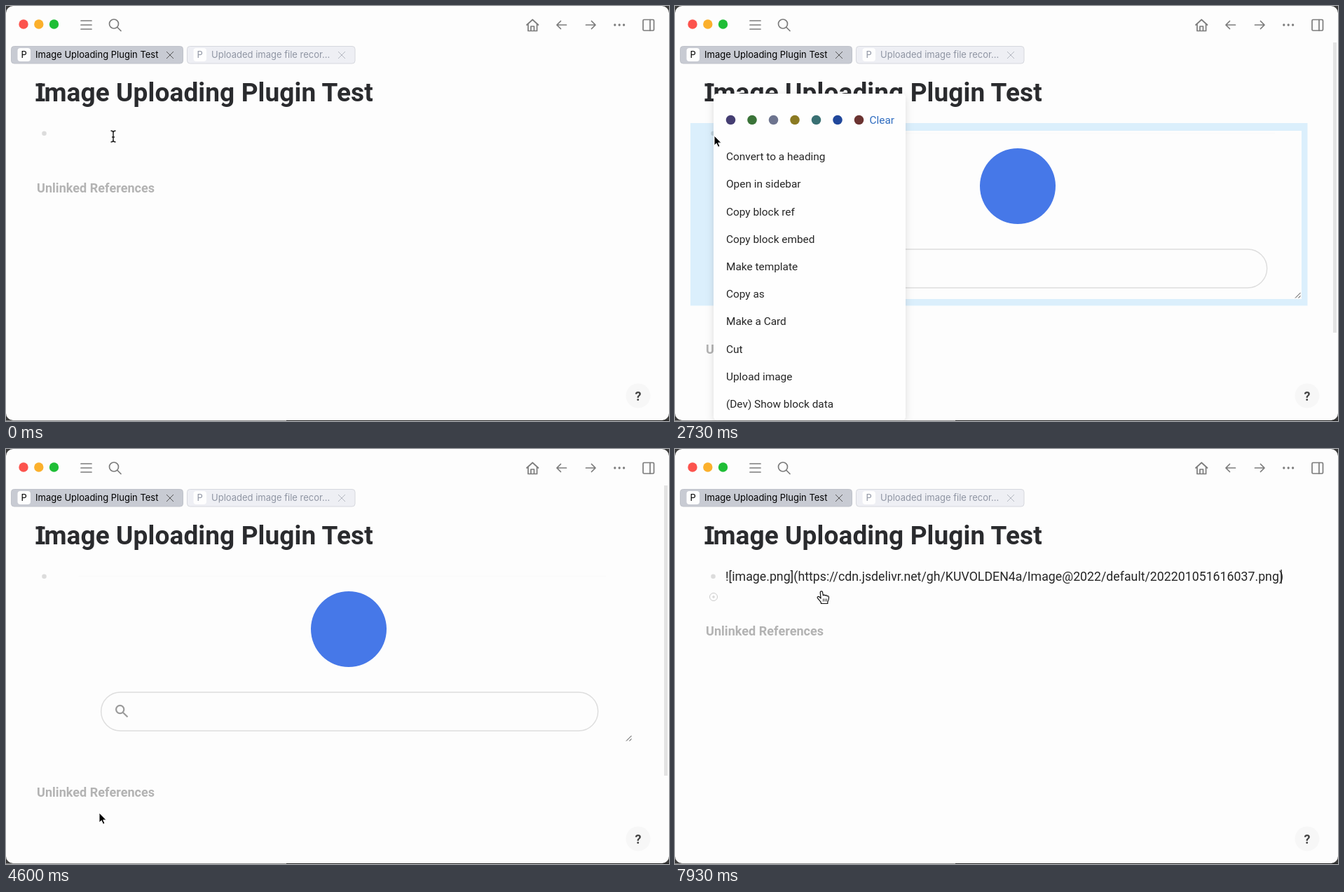
These frames come from a looping animation (946x592 px, 8000 ms). An HTML page:

```html
<!DOCTYPE html>
<html lang="en">
<head>
<meta charset="utf-8">
<title>Image Uploading Plugin Test</title>
<style>
  html, body { margin: 0; width: 100%; height: 100%; overflow: hidden; background: #3a3a3a; }
  svg { display: block; width: 946px; height: 592px; font-family: Roboto, "Noto Sans", sans-serif; }
  .ui { font: 13px Inter, sans-serif; }
  .icon { fill: none; stroke: #7c7c7c; stroke-width: 1.7; stroke-linecap: round; stroke-linejoin: round; }
  .title { font-weight: 700; font-size: 37px; letter-spacing: .1px; fill: #2a2b2e; }
  .refs { font-weight: 700; font-size: 18px; letter-spacing: .05px; fill: #b3b3b3; }
  .item { font-size: 15.4px; fill: #262626; }
  .link { fill: #2f6cc0; }
  .url { font-size: 17.75px; fill: #262626; }
  #menuBox { filter: drop-shadow(0 3px 6px #0002); }
</style>
</head>
<body>
<svg viewBox="0 0 946 592">
  <path d="M0 591H400V592H0Z" fill="#8a8a8a"/>
  <path d="M400 591H946V592H400Z" fill="#222"/>
  <rect width="946" height="591" rx="10" fill="#fdfdfd"/>

  <circle cx="25" cy="26" r="6.7" fill="#fc534d"/>
  <circle cx="46.8" cy="26" r="6.7" fill="#fbb02c"/>
  <circle cx="68.5" cy="26" r="6.7" fill="#1fbe36"/>
  <g class="icon">
    <path d="M107 21H122M107 27H122M107 33H122"/>
    <circle cx="154" cy="25.5" r="6.5"/><path d="M159 30.5L164 35.5"/>
    <path d="M743 27L751.3 19.5L759.6 27M745 25.5V35.5H757.6V25.5M749 35.5V29H753.5V35.5"/>
    <path d="M799.5 27H786M791.5 21.5L786 27L791.5 32.5"/>
    <path d="M827.5 27H841M835.5 21.5L841 27L835.5 32.5"/>
    <rect x="909" y="19.5" width="15.5" height="15.5" rx="1.5"/><path d="M919 19.5V35"/>
  </g>
  <path d="M868.8 27h0M875.2 27h0M881.6 27h0" stroke="#7c7c7c" stroke-width="3.3" stroke-linecap="round"/>

  <g class="ui">
    <rect x="7.5" y="57.5" width="245" height="24.5" rx="4" fill="#c8cbd3" stroke="#bfc2ca"/>
    <rect x="16.5" y="60" width="18.5" height="19" rx="4" fill="#fefefe"/>
    <text x="21.6" y="74">P</text>
    <text x="42" y="74">Image Uploading Plugin Test</text>
    <path d="M229 65L239 75M239 65L229 75" stroke="#555"/>
    <rect x="258.5" y="57.5" width="239.5" height="24.5" rx="4" fill="#eeeff4" stroke="#d6d8de"/>
    <rect x="267.5" y="60" width="18.5" height="19" rx="4" fill="#fefefe"/>
    <g fill="#8f95a3">
      <text x="272.6" y="74">P</text>
      <text x="293" y="74">Uploaded image file recor...</text>
    </g>
    <path d="M474 65L484 75M484 65L474 75" stroke="#b4b8c1"/>
  </g>

  <text class="title" x="43.5" y="136">Image Uploading Plugin Test</text>
  <path d="M42.5 110.5H55.5V114.5H42.5ZM42.5 132H55.5V136H42.5Z" fill="#2a2b2e"/>

  <rect id="select" x="22" y="167" width="880.5" height="260.5" fill="#b5dffb"/>
  <circle id="halo" cx="54.5" cy="181.5" r="9" fill="#e5e7e7"/>
  <circle cx="54.5" cy="181.8" r="3.3" fill="#000" opacity=".13"/>

  <g id="image">
    <rect x="72" y="178" width="822" height="240" fill="#fdfdfd"/>
    <path d="M103 181.5H856" stroke="#fafafa"/>
    <circle cx="489" cy="257" r="54" fill="#4678e8"/>
    <rect x="135.7" y="347" width="709" height="55" rx="27.5" fill="none" stroke="#dedede" stroke-width="1.5"/>
    <g fill="none" stroke="#9b9b9b" stroke-width="2.2">
      <circle cx="162.7" cy="371.5" r="5.6"/><path d="M167 376L173.5 382.3"/>
    </g>
    <path d="M885 416.5L892.5 409M889.5 416.5L892.5 413.5" stroke="#444"/>
    <rect x="939" y="52" width="5" height="414" fill="#e3e3e3"/>
  </g>

  <g id="edit">
    <text class="url" id="url" x="72" y="188">![image.png](https://cdn.jsdelivr.net/gh/KUVOLDEN4a/Image@2022/default/202201051616037.png)</text>
    <path id="caret" d="M0 172V192" stroke="#111" stroke-width="1.3"/>
    <circle cx="55" cy="211" r="5.5" fill="none" stroke="#ccc"/>
    <path d="M53 211H57M55 209V213" stroke="#ccc"/>
  </g>

  <text class="refs" id="refs" x="44">Unlinked References</text>

  <circle cx="902" cy="556" r="17.5" fill="#f7f7f7"/>
  <text x="902" y="562.5" text-anchor="middle" font-size="18" font-weight="700" fill="#444">?</text>

  <g id="menu">
    <rect id="menuBox" x="55" y="114" width="274" height="466" rx="5" fill="#fefefe"/>
    <g id="rows"></g>
    <text class="item link" x="277.5" y="157">Clear</text>
  </g>

  <g id="cursor" stroke-linejoin="round">
    <path id="beam" d="M-3.5-8Q0-8 0-5.5Q0-8 3.5-8M0-6V6M-3.5 8Q0 8 0 5.5Q0 8 3.5 8M-2 1H2" fill="none" stroke="#222" stroke-width="1.5"/>
    <path id="arrow" d="M0 0V14L3.2 11L5.6 16.3L8 15.2L5.7 10.2H10Z" stroke="#fff"/>
    <g id="hand" stroke="#111" stroke-width="1.2">
      <path fill="#fff" d="M-1.8 2C-2-.8 1.4-.8 1.6 1.5L2.4 6C2.8 4.6 5 4.8 5.2 6.2C5.8 5.2 7.8 5.6 8 7C8.8 6.3 10.4 6.8 10.5 8.2C10.8 12 9.5 13.5 8.8 15V17.5H-.5L-.8 15.5C-2.5 13.5-4 11.5-5.6 9.6C-6.6 8-4.6 6.8-3 8L-.9 10Z"/>
      <path d="M2.5 10.5V14.5M4.9 10.5V14.5M7.2 10.5V14.5" stroke-width=".9"/>
    </g>
  </g>
</svg>

<script>
const LOOP = 8000, ROW = 39.2, ROW_TOP = 184.4;
const $ = id => document.getElementById(id);
const show = (id, on) => $(id).style.display = on ? "" : "none";
const within = (t, a, b) => t >= a && t < b;
const clamp = v => Math.max(0, Math.min(1, v));

const items = ["Convert to a heading", "Open in sidebar", "Copy block ref", "Copy block embed", "Make template",
  "Copy as", "Make a Card", "Cut", "Upload image", "(Dev) Show block data"];
const swatches = ["#453e72", "#3a7338", "#6d748f", "#8b7a22", "#397073", "#20479b", "#6b3331"];

$("rows").innerHTML =
  swatches.map((c, i) => `<circle cx="${79.5 + 30.5 * i}" cy="151.5" r="6.8" fill="${c}"/>`).join("") +
  items.map((s, i) => {
    const y = ROW_TOP + ROW * i;
    return `<rect x="55" y="${y}" width="274" height="${ROW}" fill="#f1f1f1"/>` +
      `<text class="item" x="73" y="${y + 24.8}">${s}</text>`;
  }).join("");
const rowBoxes = [...$("rows").querySelectorAll("rect")];
const rowTexts = [...$("rows").querySelectorAll("text")];

// Pointer path: time, x, y
const path = [[0, 153, 186], [600, 153, 186], [1400, 300, 300], [2200, 57, 190], [2400, 57, 190], [2680, 56, 185],
  [2800, 56, 185], [3400, 122, 482], [3530, 129, 512], [4000, 133, 519], [4600, 133, 519], [5000, 136, 518],
  [6730, 136, 518], [7500, 209, 206], [7900, 209, 203], [LOOP, 209, 203]];

function pointer(t) {
  const i = Math.max(1, path.findIndex(k => k[0] >= t));
  const [t0, x0, y0] = path[i - 1], [t1, x1, y1] = path[i];
  const p = clamp((t - t0) / (t1 - t0)), e = p * p * (3 - 2 * p);
  return [x0 + (x1 - x0) * e, y0 + (y1 - y0) * e];
}

function hoveredRow(t) {
  const [x, y] = pointer(t);
  return x > 58 ? Math.floor((y - ROW_TOP) / ROW) : -1;
}

function cursorKind(t) {
  if (t < 2050) return "beam";
  if (t < 2690 || within(t, 2860, 3860) || t >= 7350) return "hand";
  return "arrow";
}

function draw(t) {
  const image = within(t, 1530, 5730) || within(t, 5800, 7530);
  const pasted = t >= 7530;
  show("image", image);
  $("refs").setAttribute("y", image ? 495.5 : 265.5);

  show("edit", within(t, 700, 1530) || pasted);
  show("url", pasted);
  $("caret").setAttribute("transform", `translate(${pasted ? 865 : 72.5})`);

  show("halo", within(t, 2150, 2660));
  $("select").style.opacity = t < 3860 ? clamp((t - 2660) / 150) : 0;

  show("menu", within(t, 2690, 3860));
  $("menu").setAttribute("transform", `translate(0 ${t < 2800 ? 11 : 0})`);
  const now = hoveredRow(t), before = hoveredRow(t - 100);
  rowBoxes.forEach((box, i) => {
    box.style.opacity = (i === now) * .75 + (i === before) * .25;
    rowTexts[i].style.fill = i === now ? "#2b57a3" : "";
  });

  const kind = cursorKind(t);
  for (const id of ["beam", "arrow", "hand"]) show(id, id === kind);
  $("cursor").setAttribute("transform", `translate(${pointer(t)})`);
}

function tick() {
  draw(performance.now() % LOOP);
  requestAnimationFrame(tick);
}
tick();
</script>
</body>
</html>
```
